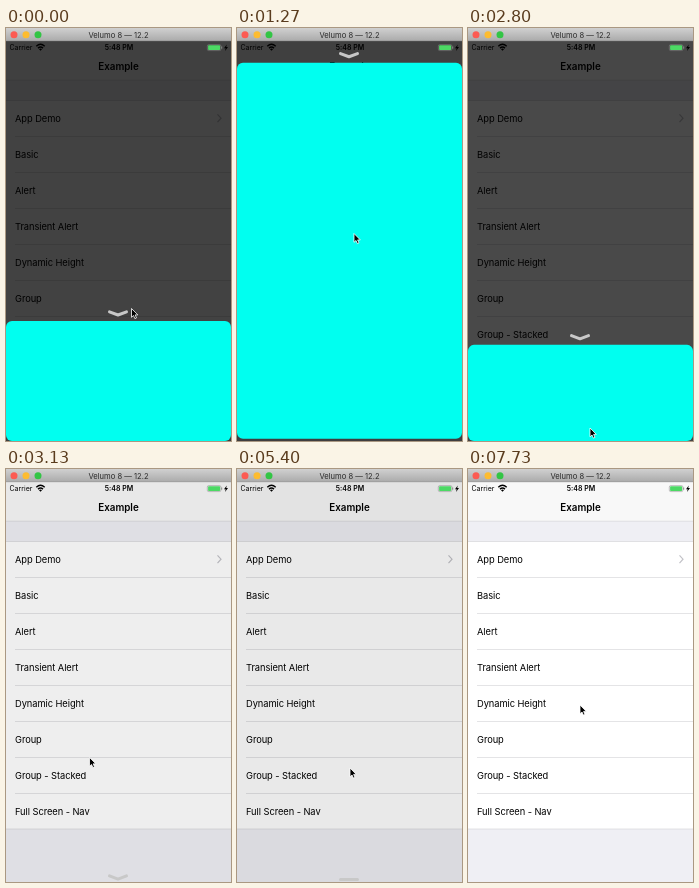
Animation, 225 px wide and 413 px high, one loop 8000 ms. Source, as an HTML page:

```html
<!DOCTYPE html>
<html lang="en">
<head>
<meta charset="utf-8">
<title>Sheet demo</title>
<style>
  html, body { margin: 0; width: 100%; height: 100%; overflow: hidden; background: #efeff4; }
  svg { display: block; width: 225px; height: 413px; }
  text { font-family: Inter, Roboto, sans-serif; }
  .row { font-size: 9.3px; letter-spacing: -.06px; }
  .nav { font-size: 9.8px; font-weight: 600; }
  .status { font-size: 7px; }
  .title { font-size: 7.6px; fill: #2a2a2a; }
  .error { font-size: 9.3px; fill: #f3201c; }
  .mid { text-anchor: middle; }
  .line { stroke: #d2d2d5; stroke-width: .6; }
  .grip { fill: none; stroke: #c8c8c8; stroke-width: 3; stroke-linecap: round; stroke-linejoin: round; }
</style>
</head>
<body>
<svg viewBox="0 0 225 413">
  <defs>
    <linearGradient id="bar" x2="0" y2="1">
      <stop stop-color="#d0d0d0"/><stop offset="1" stop-color="#aaa"/>
    </linearGradient>
  </defs>

  <rect width="225" height="413" fill="#efeff4"/>
  <rect y="13" width="225" height="39" fill="#f8f8f8"/>
  <path class="line" d="M0 52.2H225"/>
  <text class="nav mid" x="112.5" y="42">Example</text>
  <rect y="72.5" width="225" height="287.5" fill="#fff"/>
  <path class="line" d="M0 72.5H225M0 360H225"/>
  <g id="list"></g>
  <path d="M211.5 86.3L215 90.2L211.5 94.1" fill="none" stroke="#c2c2c7" stroke-width="1.2"/>

  <rect id="dim" y="13" width="225" height="400"/>

  <g id="sheet">
    <rect id="panel" width="225" rx="6" fill="#00fff0"/>
    <path class="grip" d="M103.5 -9.2L112 -6L120.5 -9.2"/>
  </g>
  <g id="alert">
    <rect x="24" width="177" height="36" rx="5" fill="#f9f7d2"/>
    <text class="error mid" x="112.8" y="21.4">THIS IS AN ERROR!</text>
    <path class="grip" id="handle" d="M103.5 -7H120.5"/>
  </g>

  <text class="status" x="3.5" y="22">Carrier</text>
  <path d="M30.3 18.3Q34.5 14.3 38.7 18.3M32 20.1Q34.5 17.9 37 20.1" fill="none" stroke="#000" stroke-width="1.4"/>
  <path d="M33 21.2Q34.5 20 36 21.2L34.5 22.8Z"/>
  <text class="status mid" x="113" y="22" font-weight="600">5:48 PM</text>
  <rect x="201.3" y="16.6" width="13.6" height="6" rx="1.4" fill="none" stroke="#888" stroke-width=".5"/>
  <rect x="202.1" y="17.3" width="12" height="4.6" rx=".7" fill="#4cd964"/>
  <path d="M215.7 18.5v2.2" stroke="#888"/>
  <path d="M220.8 16.4L218 20.2H219.7L219 23L222 19.1H220.2Z"/>

  <rect width="225" height="13" fill="url(#bar)"/>
  <path d="M0 12.8H225" stroke="#8f8f8f" stroke-width=".5"/>
  <g id="lights"></g>
  <text class="title mid" x="112.5" y="9.6">Velumo 8 — 12.2</text>

  <path id="cursor" d="M0 0V8.8L2 7L3.4 10.1L5 9.4L3.6 6.4H6.3Z" stroke="#fff" stroke-width=".8"/>
</svg>
<script>
const LOOP = 8000, BOTTOM = 413;
const REST = 293, FULL = 37;        // sheet stops
const SHOWN = 353, HIDDEN = 426;    // alert stops
const SHADE = .74, RISE = 660, FALL = 800;
const $ = id => document.getElementById(id);

$('lights').innerHTML = ['#fc5b53', '#fdbc30', '#33c545']
  .map((c, i) => `<circle cx="${8 + 12 * i}" cy="6.8" r="3.5" fill="${c}"/>`).join('');

$('list').innerHTML = ['App Demo', 'Basic', 'Alert', 'Transient Alert', 'Dynamic Height',
  'Group', 'Group - Stacked', 'Full Screen - Nav'].map((name, i) => {
    const y = 72.5 + 36 * i;
    const line = i ? `<path class="line" d="M9 ${y}H225"/>` : '';
    return `${line}<text class="row" x="9" y="${y + 21}">${name}</text>`;
  }).join('');

const smooth = u => u * u * (3 - 2 * u);
const easeOut = u => 1 - (1 - u) ** 3;
const snap = u => 1 + 1.6 * (u - 1) ** 3 + .6 * (u - 1) ** 2;   // slight overshoot
const ramp = (t, start, span, ease = smooth) =>
  ease(Math.min(1, Math.max(0, (t - start) / span)));

const home = { x: 125.5, y: 280.5 };
const moves = [
  { at: 270, span: 460, x: 125.5, y: 255 },
  { at: 870, span: 170, x: 117, y: 205.5 },
  { at: 1730, span: 600, x: 122, y: 380 },
  { at: 2600, span: 200, x: 122, y: 400 },
  { at: 2850, span: 550, x: 47.5, y: 184 },
  { at: 3450, span: 220, x: 64.5, y: 147 },
  { at: 3930, span: 670, x: 113, y: 299 },
  { at: 5420, span: 380, x: 68.5, y: 205 },
  { at: 6870, span: 850, x: 112, y: 236 },
];

function pointer(t) {
  return moves.reduce((p, m) => {
    const k = ramp(t, m.at, m.span);
    return { x: p.x + (m.x - p.x) * k, y: p.y + (m.y - p.y) * k };
  }, home);
}

const move = (id, x, y) => $(id).setAttribute('transform', `translate(${x} ${y})`);

function draw(t) {
  // Sheet: pulled up, snapped full, pulled back, then thrown off the bottom.
  const lift = 27 * ramp(t, 270, 460) + 49 * ramp(t, 870, 170);
  const gone = ramp(t, 2794, 606, easeOut);
  const top = REST - lift - (REST - FULL - 76) * ramp(t, 1030, 320, snap)
    + (REST - FULL) * ramp(t, 1730, 600) + 20 * ramp(t, 2600, 200) + 113 * gone;
  move('sheet', 0, top);
  $('panel').setAttribute('height', Math.max(0, BOTTOM - Math.max(FULL, top)));

  // The alert shows twice: with shade and handle, then plain.
  const fade = ramp(t, 4990, FALL, easeOut);
  const shown = ramp(t, 3870, RISE, easeOut) - fade
    + ramp(t, 5980, RISE, easeOut) - ramp(t, 6920, FALL, easeOut);
  move('alert', 0, HIDDEN + (SHOWN - HIDDEN) * shown);
  $('handle').style.display = t < 5900 ? '' : 'none';

  $('dim').setAttribute('opacity', SHADE * (1 - gone + ramp(t, 3870, RISE) - fade));
  const p = pointer(t);
  move('cursor', p.x, p.y);
}

const start = performance.now();
function tick(now) {
  draw(Math.max(0, now - start) % LOOP);
  requestAnimationFrame(tick);
}
draw(0);
requestAnimationFrame(tick);
</script>
</body>
</html>
```
